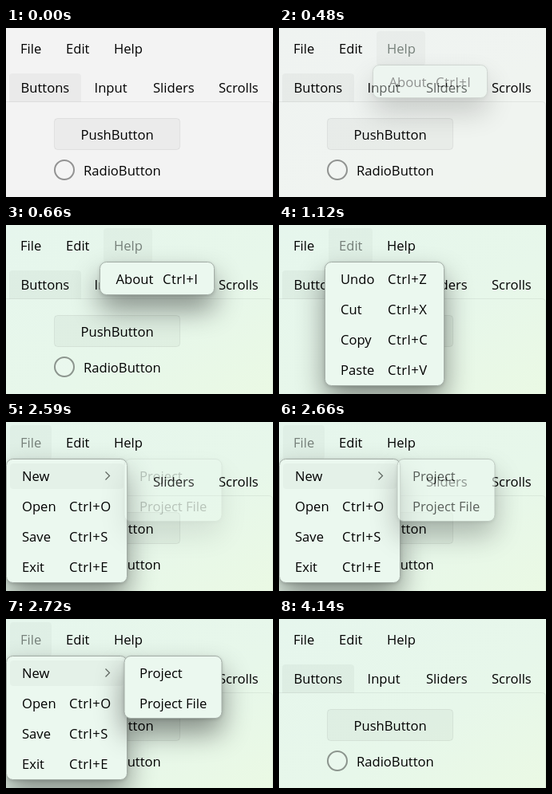
These frames come from a looping animation (334 px wide and 212 px high, 4.3 s). An HTML page:

```html
<!DOCTYPE html>
<html lang="en">
<head>
<meta charset="utf-8">
<title>Menu bar</title>
<style>
html, body { margin: 0; width: 100%; height: 100%; overflow: hidden; background: #f3f3f3; }
svg { display: block; width: 334px; height: 212px; }
text { font: 16.6px "Open Sans", "Noto Sans", sans-serif; fill: #000; white-space: pre; }
.key { letter-spacing: .5px; }
.hover { fill: #000; fill-opacity: .027; }
.tab { fill: #000; fill-opacity: .037; }
.edge { fill: none; stroke: #000; stroke-opacity: .06; }
.push { fill: #000; fill-opacity: .03; stroke: #000; stroke-opacity: .065; }
.radio { fill: #fff; fill-opacity: .15; stroke: #000; stroke-opacity: .4; stroke-width: 2; }
.panel {
  fill: #ebf8ef; stroke: #a3ada6; stroke-width: 1;
  filter: drop-shadow(0 1px 2px rgba(0,0,0,.16)) drop-shadow(0 18px 17px rgba(0,0,0,.42));
}
.chevron { fill: none; stroke: #5d655f; stroke-width: 1.2; }

/* one loop = 4300 ms */
.tint, .menu, .on, .bar text { animation: 4300ms step-end infinite; }
.menu, .on { opacity: 0; }
.tint { animation-name: tint; }
.help { animation-name: help; }
.help-on { animation-name: help-on; }
.edit, .edit-on { animation-name: edit; }
.file, .file-on { animation-name: file; }
.sub { animation-name: sub; }
.new-on { animation-name: new-on; }
.bar .t-help { animation-name: t-help; }
.bar .t-edit { animation-name: t-edit; }
.bar .t-file { animation-name: t-file; }

@keyframes tint {
  0% { opacity: 0; }
  10% { opacity: 0; animation-timing-function: steps(7, jump-both); }
  15.349%, 100% { opacity: 1; }
}
@keyframes help {
  0% { opacity: 0; }
  10% { opacity: 0; animation-timing-function: steps(4, jump-both); }
  13.023% { opacity: 1; }
  26.046%, 100% { opacity: 0; }
}
@keyframes help-on { 0% { opacity: 0; } 10% { opacity: 1; } 26.046%, 100% { opacity: 0; } }
@keyframes edit { 0% { opacity: 0; } 26.046% { opacity: 1; } 37.209%, 100% { opacity: 0; } }
@keyframes file { 0% { opacity: 0; } 37.209% { opacity: 1; } 96.279%, 100% { opacity: 0; } }
@keyframes new-on { 0% { opacity: 0; } 60.232% { opacity: 1; } 96.279%, 100% { opacity: 0; } }
@keyframes sub {
  0% { opacity: 0; }
  60.232% { opacity: 0; animation-timing-function: steps(4, jump-both); }
  63.255% { opacity: 1; }
  96.279%, 100% { opacity: 0; }
}
@keyframes t-help { 0% { fill: #000; } 10% { fill: #76807a; } 26.046%, 100% { fill: #000; } }
@keyframes t-edit { 0% { fill: #000; } 26.046% { fill: #76807a; } 37.209%, 100% { fill: #000; } }
@keyframes t-file { 0% { fill: #000; } 37.209% { fill: #76807a; } 96.279%, 100% { fill: #000; } }
</style>
</head>
<body>
<svg viewBox="0 0 334 212">
  <defs>
    <linearGradient id="mica" x1="0" y1="0" x2="1" y2="1">
      <stop offset="0" stop-color="#e6f6ed"/>
      <stop offset=".6" stop-color="#e7f7ea"/>
      <stop offset="1" stop-color="#eaf9e4"/>
    </linearGradient>
  </defs>

  <rect width="334" height="212" fill="#f3f3f3"/>
  <rect class="tint" width="334" height="212" fill="url(#mica)"/>

  <g class="bar">
    <rect class="hover on file-on" x="5" y="4" width="52" height="43" rx="4"/>
    <rect class="hover on edit-on" x="62" y="4" width="55" height="43" rx="4"/>
    <rect class="hover on help-on" x="122" y="4" width="61" height="43" rx="4"/>
    <text class="t-file" x="18" y="32">File</text>
    <text class="t-edit" x="75" y="32">Edit</text>
    <text class="t-help" x="135" y="32">Help</text>
  </g>

  <path class="tab" d="M4 93V61q0-4 4-4h82q4 0 4 4v32z"/>
  <path class="edge" d="M0 92.500H328.500q5 0 5 5V212"/>
  <text x="18.500" y="81">Buttons</text>
  <text x="110.500" y="81">Input</text>
  <text x="184" y="81">Sliders</text>
  <text x="266" y="81">Scrolls</text>

  <rect class="push" x="60.500" y="113.500" width="157" height="39" rx="4"/>
  <text x="93.500" y="140">PushButton</text>
  <circle class="radio" cx="73" cy="178" r="12"/>
  <text x="97" y="185">RadioButton</text>

  <g class="menu help">
    <rect class="panel" x="117.500" y="46.500" width="143" height="41" rx="8"/>
    <text x="137.500" y="74">About</text>
    <text class="key" x="196" y="74">Ctrl+I</text>
  </g>

  <g class="menu edit">
    <rect class="panel" x="57.500" y="46.500" width="149" height="155" rx="8"/>
    <text x="77" y="74">Undo</text><text class="key" x="136" y="74">Ctrl+Z</text>
    <text x="77" y="112">Cut</text><text class="key" x="136" y="112">Ctrl+X</text>
    <text x="77" y="150">Copy</text><text class="key" x="136" y="150">Ctrl+C</text>
    <text x="77" y="188">Paste</text><text class="key" x="136" y="188">Ctrl+V</text>
  </g>

  <g class="menu file">
    <rect class="panel" x=".5" y="46.500" width="151" height="155" rx="8"/>
    <rect class="hover on new-on" x="5" y="52" width="142" height="32" rx="4"/>
    <text x="20" y="74">New</text>
    <path class="chevron" d="M124.500 62.500l5 5l-5 5"/>
    <text x="20" y="112">Open</text><text class="key" x="79" y="112">Ctrl+O</text>
    <text x="20" y="150">Save</text><text class="key" x="79" y="150">Ctrl+S</text>
    <text x="20" y="188">Exit</text><text class="key" x="79" y="188">Ctrl+E</text>
  </g>

  <g class="menu sub">
    <rect class="panel" x="148" y="46.500" width="122" height="78" rx="8"/>
    <text x="167" y="74">Project</text>
    <text x="167" y="112">Project File</text>
  </g>
</svg>
</body>
</html>
```
